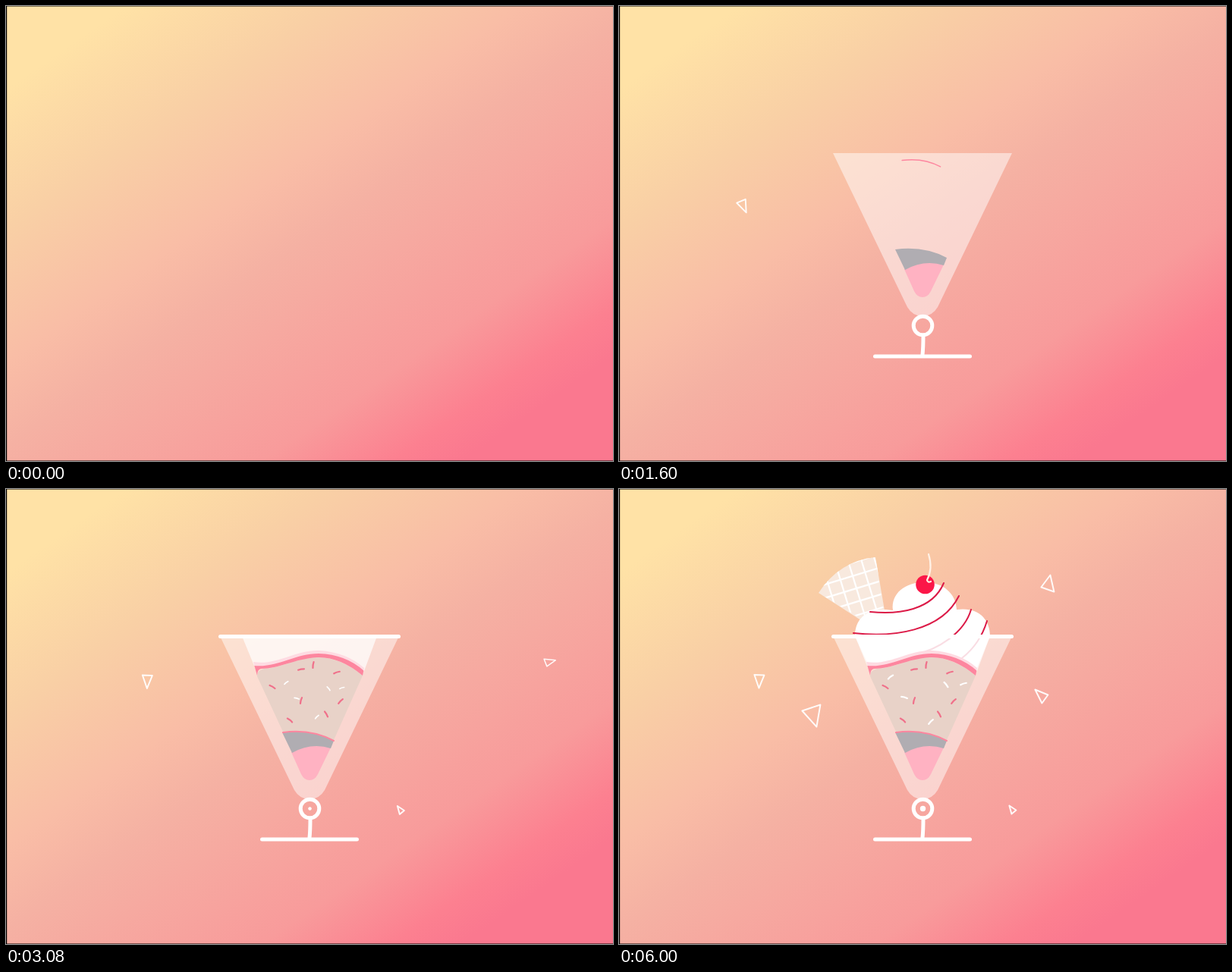
Recreate the animation shown at these times as an HTML page. Size 800x600 px, loop 6.04 s.

```html
<!DOCTYPE html>
<html lang="en">
<head>
<meta charset="utf-8">
<title>Sundae</title>
<style>
html, body { margin: 0; width: 100%; height: 100%; overflow: hidden; }
svg { display: block; width: 100vw; height: 100vh; }
.line { fill: none; stroke-linecap: round; stroke-linejoin: round; }
</style>
</head>
<body>
<svg viewBox="0 0 800 600">
  <defs>
    <linearGradient id="sky" gradientUnits="userSpaceOnUse" x1="51" y1="74" x2="474" y2="687">
      <stop offset="0" stop-color="#ffe2a6"/>
      <stop offset=".2" stop-color="#f9d0a5"/>
      <stop offset=".4" stop-color="#f9bda6"/>
      <stop offset=".52" stop-color="#f5b1a3"/>
      <stop offset=".8" stop-color="#f89b9b"/>
      <stop offset=".93" stop-color="#fc8090"/>
      <stop offset="1" stop-color="#fa788f"/>
    </linearGradient>
    <clipPath id="waferEdge"><path d="M263 137Q290 95 338 90L349 160L325 175Z"/></clipPath>
  </defs>
  <rect width="800" height="600" fill="url(#sky)"/>

  <g id="wafer">
    <path d="M263 137Q290 95 338 90L352 172L325 177Z" fill="#f8e9de"/>
    <g clip-path="url(#waferEdge)"><g id="grid" class="line" stroke="#fff" stroke-width="2.2"></g></g>
  </g>

  <g id="cream">
    <path fill="#fff" d="M311 194C311 172 325 158 352 159L361 160C358 138 377 123 402 123C428 123 444 138 445 159C474 155 489 172 489 194L471 238Q430 214 400 220Q355 234 328 231Z"/>
    <g id="stripes" class="line" stroke="#dc1a47" stroke-width="2">
      <path pathLength="1" d="M331 162C368 166 413 160 428 124"/>
      <path pathLength="1" d="M309 190C360 196 425 188 448 141"/>
      <path pathLength="1" d="M390 218C420 212 455 190 464 159"/>
      <path pathLength="1" d="M452 223Q476 204 485 174"/>
    </g>
  </g>

  <path id="syrup" fill="#ff6485" d="M376 347Q402 332 428 341L411 376Q407 384 400 384Q393 384 389 376Z"/>
  <path id="fudge" fill="#605b64" d="M364 321Q402 316 432 332L428 342Q402 334 377 348Z"/>
  <path id="scoop" fill="#d1a691" d="M331 247Q331 239 340 237C362 236 380 224 408 222Q440 221 470 246L432 331Q402 317 365 320Z"/>
  <path id="glaze" class="line" stroke="#fc0d3f" stroke-width="2" d="M365 321Q402 316 432 332"/>
  <path id="band" fill="#fc0d3f" d="M326 228C358 233 380 212 413 213Q448 215 472 236L470 246Q440 221 410 222C380 224 360 237 336 237Q331 238 331 246Z"/>
  <path id="foam" fill="#fff" fill-opacity=".7" d="M311 194H489L472 240Q448 218 412 217C380 217 358 236 327 233Z"/>
  <path id="glass" fill="#fff" fill-opacity=".5" d="M282 194H518L420 397Q413 409 400 409Q387 409 380 397Z"/>
  <g id="redBits" class="line" stroke="#f0708a" stroke-width="2.2"></g>
  <g id="whiteBits" class="line" stroke="#fff" stroke-width="2.2"></g>

  <g class="line" stroke="#fff" stroke-width="5">
    <path id="rim" d="M282.5 194.5H517.5"/>
    <path id="base" d="M337.5 462H462.5"/>
    <path id="stem" d="M401 435Q401 450 400 460"/>
    <circle id="ring" cx="400.5" cy="421.5" r="12.3"/>
  </g>
  <circle id="dot" cx="400.5" cy="421.5" r="3.7" fill="#fff"/>

  <g id="cherry">
    <circle cx="403.5" cy="126" r="12.3" fill="#fb1748"/>
    <path class="line" stroke="#fff1e6" stroke-width="2.2" d="M408 86Q414 105 406 120Q407 124 411 122"/>
  </g>

  <g id="triangles" class="line" stroke="#fff" stroke-opacity=".92" stroke-width="2"></g>
  <path d="M0 0H1.2V600H0ZM0 0H800V.6H0ZM0 599.4H800V600H0Z"/>
</svg>
<script>
const LOOP = 6040;
const NS = 'http://www.w3.org/2000/svg';
const el = id => document.getElementById(id);
const mix = (a, b, p) => a + (b - a) * p;
const span = (t, start, dur) => Math.min(1, Math.max(0, (t - start) / dur));
const sine = p => (1 - Math.cos(Math.PI * p)) / 2;
const outQuad = p => 1 - (1 - p) ** 2;
const outCubic = p => 1 - (1 - p) ** 3;

// Damped spring from 0 to 1, starting at a given time.
function spring(t, start, decay, speed) {
  const s = (t - start) / 1000;
  return s <= 0 ? 0 : 1 - Math.exp(-decay * s) * Math.cos(speed * s);
}

function addPath(parent, d) {
  const path = document.createElementNS(NS, 'path');
  path.setAttribute('d', d);
  return parent.appendChild(path);
}

// Moves, turns and scales a part around its pivot.
function place(node, [x, y], { dx = 0, dy = 0, sx = 1, sy = sx, turn = 0 }) {
  node.setAttribute('transform',
    `translate(${x + dx} ${y + dy}) rotate(${turn}) scale(${sx} ${sy}) translate(${-x} ${-y})`);
  node.style.visibility = sx > 0.001 ? 'visible' : 'hidden';
}

function addBits(parent, list) {
  for (const [x, y, angle] of list) {
    addPath(parent, 'M-4 0Q0 -.8 4 0').setAttribute('transform', `translate(${x} ${y}) rotate(${angle})`);
  }
}
addBits(el('redBits'), [[351, 261, 30], [389, 238, -10], [405, 232, -82], [436, 242, -18],
  [389, 279, -75], [441, 280, -45], [422, 297, 60], [374, 305, 38]]);
addBits(el('whiteBits'), [[358, 248, -38], [376, 275, 15], [431, 258, 52], [454, 257, -18], [411, 307, -45]]);

for (let i = -2; i <= 2; i++) {
  const k = i * 17;
  const line = addPath(el('grid'), `M-45 ${k}H45M${k} -45V45`);
  line.setAttribute('transform', 'translate(313 131) rotate(-17)');
}

const drops = [
  { id: 'syrup', pivot: [402, 361], start: 650, rise: 380, small: 0.2 },
  { id: 'fudge', pivot: [398, 334], start: 780, rise: 360, small: 0.34 },
  { id: 'glaze', pivot: [398, 325], start: 1216, rise: 345, small: 0.28 },
  { id: 'scoop', pivot: [400, 276], start: 1640, rise: 340, small: 0.5 },
  { id: 'band', pivot: [400, 230], start: 1900, rise: 260, small: 0.7 },
  { id: 'foam', pivot: [400, 218], start: 2440, rise: 260, small: 0.9 }
];

const triangles = [
  { at: [186, 252], shape: 'M-6 -6.5L7 -6L0 11Z', from: [-20, 357], start: 1180, dur: 800, turn: -240, small: 0.6 },
  { at: [520, 423], shape: 'M-4 -5L5 1L-1 6Z', from: [790, 620], start: 1860, dur: 900, turn: 200, small: 0.7 },
  { at: [257, 297], shape: 'M-14 -4L10 -12L5 17Z', from: [72, 515], via: [250, 507], start: 3120, dur: 1240, turn: 118, small: 0.3 },
  { at: [559, 273], shape: 'M-9 -8L8 -1L0 10Z', from: [815, 200], start: 2960, dur: 800, turn: 200, small: 0.6 },
  { at: [568, 126], shape: 'M2 -12L7 10L-10 4Z', from: [795, -22], start: 4360, dur: 800, turn: -200, small: 0.65 }
];
for (const tri of triangles) tri.node = addPath(el('triangles'), tri.shape);

function drawTriangle(tri, t) {
  const time = span(t, tri.start, tri.dur);
  const p = tri.via ? sine(time) : tri.dur === 800 && tri.start > 4000 ? outQuad(time) : outCubic(time);
  const sway = -1.6 * Math.cos((t - 3640) / 2360 * 2 * Math.PI) * p;
  const [x, y] = [0, 1].map(i => tri.via
    ? mix(mix(tri.from[i], tri.via[i], p), mix(tri.via[i], tri.at[i], p), p)
    : mix(tri.from[i], tri.at[i], p));
  place(tri.node, [0, 0], {
    dx: x + sway, dy: y + sway * 0.3,
    sx: time > 0 ? mix(tri.small, 1, p) : 0,
    turn: tri.turn * (1 - p)
  });
}

const bezier = (a, b, c, d, p) => {
  const q = 1 - p;
  return a * q ** 3 + 3 * b * p * q * q + 3 * c * p * p * q + d * p ** 3;
};

function draw(t) {
  const fly = sine(span(t, 0, 480));
  el('ring').setAttribute('cx', bezier(776, 760, 430, 400.5, fly));
  el('ring').setAttribute('cy', bezier(-20, 350, 600, 421.5, fly));
  place(el('base'), [400, 462], { sx: spring(t, 420, 6, 12), sy: 1 });
  place(el('stem'), [400, 462], { sx: t > 440 ? 1 : 0, sy: outCubic(span(t, 440, 240)) });
  place(el('glass'), [400, 300], { sx: spring(t, 660, 10, 13) });

  for (const { id, pivot, start, rise, small } of drops) {
    const p = sine(span(t, start, 640));
    const size = mix(small, 1, p);
    let sx = size;
    if (id === 'scoop') sx *= mix(0.86, 1, sine(span(t, 2560, 340)));
    if (id === 'band') sx *= mix(1.03, 1, sine(span(t, 2600, 240)));
    place(el(id), pivot, { dy: -rise * (1 - p), sx: t > start ? sx : 0, sy: size });
  }

  place(el('rim'), [400, 194.5], { sx: outCubic(span(t, 2300, 420)), sy: 1 });
  place(el('redBits'), [400, 275], { sx: outCubic(span(t, 2320, 300)) });
  place(el('whiteBits'), [406, 280],
    { sx: outCubic(span(t, 2960, 360)) * mix(1.08, 1, sine(span(t, 3600, 400))) });
  place(el('dot'), [400.5, 421.5], { sx: outCubic(span(t, 3000, 300)) });

  place(el('cream'), [400, 180], { sx: outCubic(span(t, 3280, 700)) });
  const drawn = outQuad(span(t, 2800, 2500));
  el('stripes').setAttribute('stroke-dasharray', `${drawn} 2`);
  el('stripes').setAttribute('stroke-dashoffset', -(1 - drawn) / 2);

  const waferFall = sine(span(t, 3040, 520));
  place(el('wafer'), [340, 170], {
    dy: -200 * (1 - waferFall), sx: t > 3040 ? 1 : 0,
    turn: mix(-25, -2, waferFall) + 2 * sine(span(t, 3600, 400))
  });
  place(el('grid'), [312, 130], { sx: outCubic(span(t, 3400, 1800)) });

  const cherryFall = sine(span(t, 4440, 300));
  const left = 1 - cherryFall;
  place(el('cherry'), [403.5, 126], { dx: 7 * left, dy: -168 * left, sx: t > 4440 ? 1 + 0.18 * left : 0, turn: -26 * left });

  for (const tri of triangles) drawTriangle(tri, t);
}

const origin = performance.now();
function tick() {
  draw((performance.now() - origin) % LOOP);
  requestAnimationFrame(tick);
}
tick();
</script>
</body>
</html>
```
